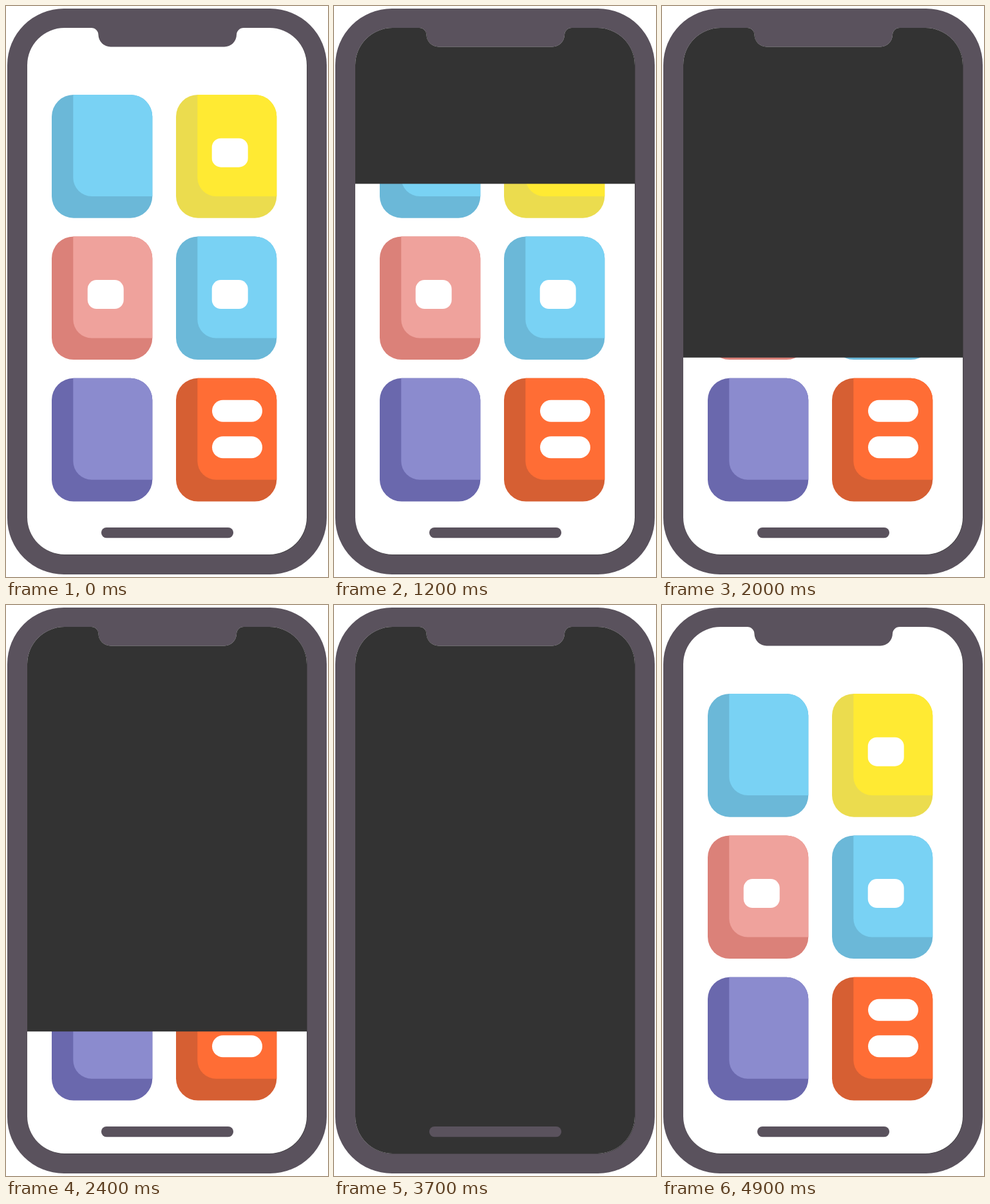
Animation of 500 by 888 pixels, one loop 5 s. Source, as an HTML page with a canvas:

```html
<!DOCTYPE html>
<html lang="en">
<head>
<meta charset="utf-8">
<title>Phone screen wipe</title>
<style>
  html, body { margin: 0; width: 100%; height: 100%; overflow: hidden; background: #fff; }
  canvas { display: block; }
</style>
</head>
<body>
<canvas width="500" height="888"></canvas>
<script>
const ctx = document.querySelector('canvas').getContext('2d');
const LOOP = 5000, FADE_END = 4900, FADE_TIME = 400;
const FRAME = '#5a525d', DARK = '#333';
const SCREEN = { left: 33, top: 34, right: 467, bottom: 853, radius: 58 };
const TILE = { w: 156.3, h: 191.7, r: 34, edge: 33.3 };

// Face and edge colours, row by row
const blue = ['#79d2f4', '#6bb8d8'];
const colors = [
  blue, ['#ffea33', '#ebdc4e'],
  ['#efa29c', '#db8179'], blue,
  ['#8b8bce', '#6a68ad'], ['#ff6d35', '#d65f33'],
];

// Time and height of the wipe's lower edge; it moves evenly between them
const wipe = [[500, 7], [1600, 430], [2400, 663], [3000, 812], [3500, SCREEN.bottom]];

function wipeEdge(t) {
  if (t <= wipe[0][0]) return 0;
  const i = wipe.findIndex(([time]) => time > t);
  if (i < 0) return SCREEN.bottom;
  const [t0, y0] = wipe[i - 1], [t1, y1] = wipe[i];
  return y0 + (y1 - y0) * (t - t0) / (t1 - t0);
}

function screenPath() {
  const { left, top, right, bottom, radius } = SCREEN;
  const path = new Path2D();
  path.moveTo(250, 63.5);
  path.arcTo(143.5, 63.5, 143.5, 44, 19);
  path.arcTo(143.5, top, 120, top, 11);
  path.arcTo(left, top, left, bottom, radius);
  path.arcTo(left, bottom, right, bottom, radius);
  path.arcTo(right, bottom, right, top, radius);
  path.arcTo(right, top, 380, top, radius);
  path.arcTo(358, top, 358, 44, 11);
  path.arcTo(358, 63.5, 250, 63.5, 19);
  path.closePath();
  return path;
}
const screenShape = screenPath();

function box(x, y, w, h, r, color) {
  ctx.fillStyle = color;
  ctx.beginPath();
  ctx.roundRect(x, y, w, h, r);
  ctx.fill();
}

function drawTile([face, edge], i) {
  const x = 71 + 193 * (i % 2), y = 138 + 220.4 * Math.floor(i / 2);
  box(x, y, TILE.w, TILE.h, TILE.r, edge);
  box(x + TILE.edge, y, TILE.w - TILE.edge, 158, [0, TILE.r, 0, 29], face);
  if (i === 5) {
    for (const dy of [34, 90.5]) box(x + 56, y + dy, 78, 34, 17, '#fff');
  } else if (i % 4) {
    box(x + 55.7, y + 67.7, 56, 45, 14, '#fff');
  }
}

function draw(t) {
  box(0, 0, 500, 888, 0, '#fff');
  box(2, 4, 496, 880, 88, FRAME);

  // Thin shadow along the right and bottom of the screen
  ctx.save();
  ctx.translate(0.5, 0.5);
  ctx.fillStyle = DARK;
  ctx.fill(screenShape);
  ctx.restore();

  ctx.save();
  ctx.clip(screenShape);
  box(0, 0, 500, 888, 0, '#fff');
  colors.forEach(drawTile);
  ctx.globalAlpha = Math.min(1, Math.max(0, (FADE_END - t) / FADE_TIME));
  box(0, 0, 500, wipeEdge(t), 0, DARK);
  ctx.restore();

  box(148, 811, 205, 16.3, 8, FRAME);
}

function tick() {
  draw(performance.now() % LOOP);
  requestAnimationFrame(tick);
}
tick();
</script>
</body>
</html>
```
